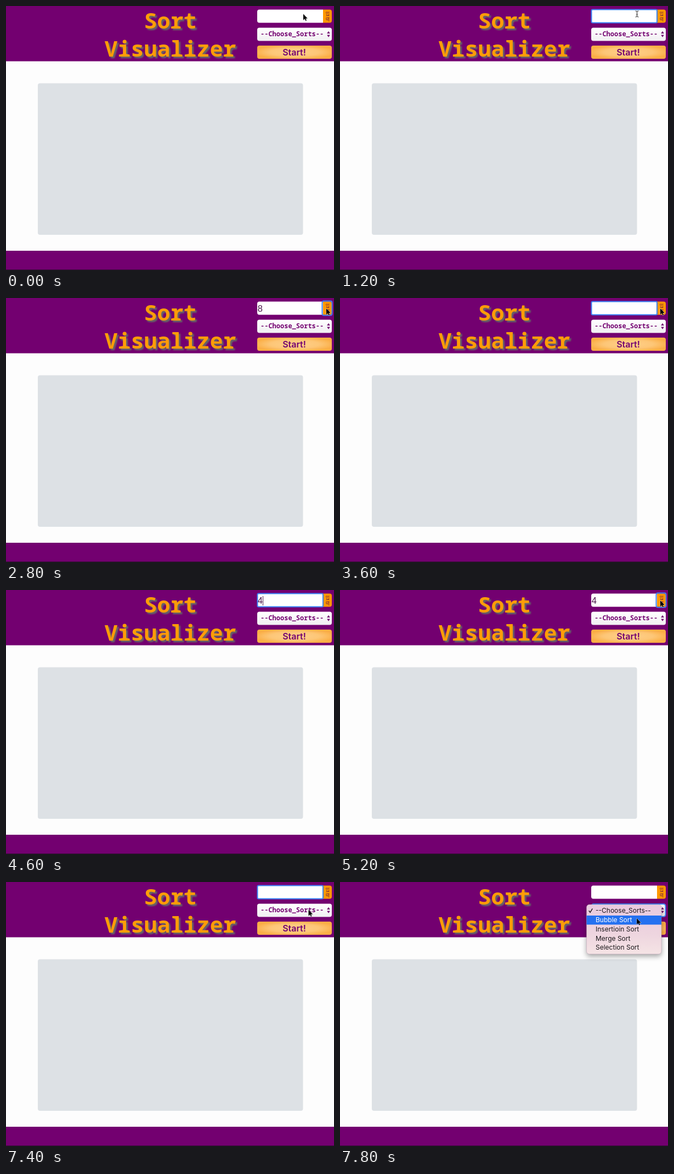
Animation of 598 by 480 pixels, one loop 8 s. Source, as an HTML page:

```html
<!DOCTYPE html>
<html lang="en">
<head>
<meta charset="utf-8">
<title>Sort Visualizer</title>
<style>
  html, body { margin: 0; width: 100%; height: 100%; overflow: hidden; background: #fdfdfd; }
  svg { display: block; width: 100%; height: 100%; }
  .purple { fill: #730070; }
  .mono { font-family: "Noto Sans Mono", "DejaVu Sans Mono", monospace; }
  .title { font-size: 40px; font-weight: 600; fill: #ff9c08; text-anchor: middle; filter: drop-shadow(3px 3px 1px #666); }
  .choose { font-size: 12px; font-weight: 600; }
  .start { font: 600 16px Inter, Roboto, sans-serif; text-anchor: middle; }
  .enter { font: 500 8px "Noto Sans CJK KR", "Noto Sans CJK", "Noto Sans CJK JP", sans-serif; text-anchor: middle; fill: #5c1048; }
  .digit { font: 16.5px "Liberation Sans", Arial, sans-serif; fill: #4d184d; }
  .ring { fill: none; stroke: #3b82f6; stroke-width: 2; }
  .menu text { font: 12px Inter, Roboto, sans-serif; fill: #1c171b; }
  .menu .lit text { fill: #fff; }
  .panel { filter: drop-shadow(0 4px 5px rgba(0, 0, 0, .35)); }

  /* Every part switches in hard steps on one shared 8 s clock. */
  .anim { animation: 8s step-end infinite; }
  #fieldRing { animation-name: field-focus; }
  #enterRing { animation-name: enter-press; }
  #selectRing, #menu { animation-name: menu-open; }
  #first { animation-name: first-lit; }
  #bubble { animation-name: bubble-lit; }
  #eight { animation-name: type-eight; }
  #four { animation-name: type-four; }
  #caret { animation-name: blink; }
  #beam { animation-name: beam-show; }
  #beamPath { animation-name: beam-move; }
  #arrow { animation-name: arrow-show; }
  #arrowPath { animation-name: arrow-move; }

  @keyframes field-focus {
    0% { opacity: 0 } 5% { opacity: 1 } 35% { opacity: 0 } 37.5% { opacity: 1 }
    65% { opacity: 0 } 67.5% { opacity: 1 } 95% { opacity: 0 } 100% { opacity: 0 }
  }
  @keyframes enter-press {
    0% { opacity: 0 } 35% { opacity: 1 } 37.5% { opacity: 0 }
    65% { opacity: 1 } 67.5% { opacity: 0 } 100% { opacity: 0 }
  }
  @keyframes menu-open { 0% { opacity: 0 } 95% { opacity: 1 } 100% { opacity: 1 } }
  @keyframes first-lit { 0% { opacity: 1 } 97.5% { opacity: 0 } 100% { opacity: 0 } }
  @keyframes bubble-lit { 0% { opacity: 0 } 97.5% { opacity: 1 } 100% { opacity: 1 } }
  @keyframes type-eight { 0% { opacity: 0 } 20% { opacity: 1 } 37.5% { opacity: 0 } 100% { opacity: 0 } }
  @keyframes type-four { 0% { opacity: 0 } 52.5% { opacity: 1 } 67.5% { opacity: 0 } 100% { opacity: 0 } }
  @keyframes blink {
    0% { opacity: 0 } 20% { opacity: 1 } 27.5% { opacity: 0 } 32.5% { opacity: 1 } 35% { opacity: 0 }
    52.5% { opacity: 1 } 60% { opacity: 0 } 100% { opacity: 0 }
  }
  @keyframes beam-show {
    0% { opacity: 0 } 2.5% { opacity: 1 } 20% { opacity: 0 }
    25% { opacity: 1 } 30% { opacity: 0 } 100% { opacity: 0 }
  }
  @keyframes beam-move {
    0% { transform: translate(541.5px, 14.5px) } 27.5% { transform: translate(561px, 16px) }
    100% { transform: translate(561px, 16px) }
  }
  @keyframes arrow-show {
    0% { opacity: 1 } 2.5% { opacity: 0 } 30% { opacity: 1 }
    52.5% { opacity: 0 } 62.5% { opacity: 1 } 100% { opacity: 1 }
  }
  @keyframes arrow-move {
    0% { transform: translate(542px, 14.5px) }
    30% { transform: translate(584px, 19px) }
    80% { transform: translate(581px, 25px) }
    82.5% { transform: translate(571px, 37px) }
    85% { transform: translate(560px, 46px) }
    87.5% { transform: translate(553px, 50px) }
    90% { transform: translate(551.5px, 50.5px) }
    97.5% { transform: translate(541px, 66px) }
    100% { transform: translate(541px, 66px) }
  }
</style>
</head>
<body>
<svg viewBox="0 0 598 480" preserveAspectRatio="none">
  <defs>
    <radialGradient id="glow" cx=".5" cy=".5" r=".55">
      <stop offset="0" stop-color="#ffd08a"/>
      <stop offset=".6" stop-color="#fdc677"/>
      <stop offset="1" stop-color="#fbae45"/>
    </radialGradient>
    <linearGradient id="control" x2="0" y2="1">
      <stop offset="0" stop-color="#fff"/>
      <stop offset="1" stop-color="#f1eff2"/>
    </linearGradient>
    <linearGradient id="glass" x2="0" y2="1">
      <stop offset="0" stop-color="#e9cadf"/>
      <stop offset=".6" stop-color="#eed5df"/>
      <stop offset="1" stop-color="#f5e4e5"/>
    </linearGradient>
  </defs>

  <rect width="598" height="480" fill="#fdfdfd"/>
  <rect class="purple" width="598" height="100.5"/>
  <rect class="purple" y="445" width="598" height="35"/>
  <rect y="479" width="598" height="1" fill="#3c0a3c"/>
  <rect x="58" y="140.5" width="483.5" height="275.5" rx="4" fill="#dde1e5"/>

  <g class="mono title">
    <text x="299.5" y="41">Sort</text>
    <text x="299.5" y="91.5">Visualizer</text>
  </g>

  <path d="M578 6.5H462a4 4 0 0 0-4 4v16a4 4 0 0 0 4 4h116z" fill="#fff"/>
  <path d="M578 6.5h12a4 4 0 0 1 4 4v16a4 4 0 0 1-4 4h-12z" fill="#ff9800"/>
  <g class="enter">
    <text x="586.5" y="16.5">입</text>
    <text x="586.5" y="26.5">력</text>
  </g>
  <text id="eight" class="digit anim" x="458.7" y="25">8</text>
  <text id="four" class="digit anim" x="458.7" y="25">4</text>
  <path id="caret" class="anim" d="M468.5 11v17" stroke="#4d184d"/>
  <rect id="fieldRing" class="ring anim" x="458.5" y="6.5" width="119.5" height="24" rx="2"/>
  <rect id="enterRing" class="ring anim" x="576.5" y="5.5" width="18" height="26" rx="3"/>

  <rect x="458" y="39.5" width="136" height="24" rx="4" fill="url(#control)"/>
  <text class="mono choose purple" x="464" y="55">--Choose_Sorts--</text>
  <path class="purple" d="M585.2 50l2.8-4.2 2.8 4.2zM585.2 52.5l2.8 4.2 2.8-4.2z"/>
  <rect id="selectRing" class="ring anim" x="458.5" y="40" width="135" height="23" rx="4"/>

  <rect x="458" y="72" width="136" height="24" rx="4" fill="url(#glow)"/>
  <text class="start purple" x="525.5" y="90">Start!</text>

  <g id="menu" class="menu anim">
    <rect class="panel" x="449.5" y="41" width="136.5" height="90" rx="5" fill="url(#glass)" stroke="#b99bb2" stroke-width=".5"/>
    <path d="M453.8 52.3l2.3 3 4.2-7" fill="none" stroke="#1c171b" stroke-width="1.4"/>
    <text x="466" y="56">--Choose_Sorts--</text>
    <text x="466" y="73">Bubble Sort</text>
    <text x="466" y="90">Insertioin Sort</text>
    <text x="466" y="106.5">Merge Sort</text>
    <text x="466" y="123">Selection Sort</text>
    <g id="first" class="lit anim">
      <rect x="449.5" y="44" width="136.5" height="16.7" fill="#2571f0"/>
      <path d="M453.8 52.3l2.3 3 4.2-7" fill="none" stroke="#fff" stroke-width="1.4"/>
      <text x="466" y="56">--Choose_Sorts--</text>
    </g>
    <g id="bubble" class="lit anim">
      <rect x="449.5" y="61" width="136.5" height="16.5" fill="#2571f0"/>
      <text x="466" y="73">Bubble Sort</text>
    </g>
  </g>

  <g id="beamPath" class="anim">
    <path id="beam" class="anim" d="M-3-5.5q3 0 3 2v7q0 2-3 2M3-5.5q-3 0-3 2M3 5.5q-3 0-3-2M-1.5.8h3" fill="none" stroke="#222"/>
  </g>
  <g id="arrowPath" class="anim">
    <path id="arrow" class="anim" d="M0 0v11.2l2.6-2.4 1.8 3.8 1.7-.8-1.8-3.6h3.6z" fill="#000" stroke="#fff" stroke-width=".8" paint-order="stroke"/>
  </g>
</svg>
</body>
</html>
```
